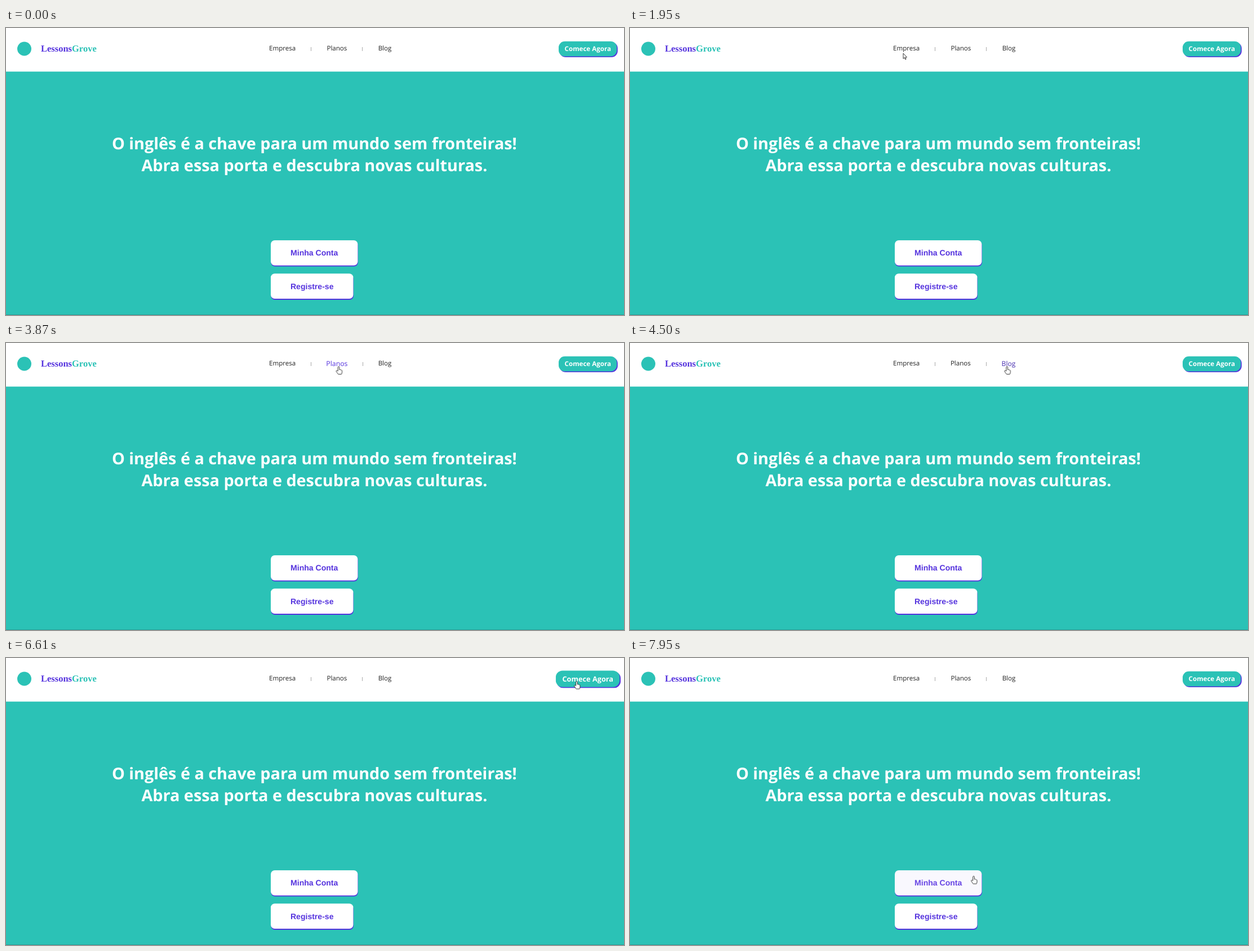
Animation, 1097 px wide and 511 px high, one loop 8 s. Source, as an HTML page:

```html
<!DOCTYPE html>
<html lang="pt-BR">
<head>
<meta charset="utf-8">
<title>LessonsGrove</title>
<style>
:root { --teal: #2bc2b6; --purple: #5533de; }
html, body { margin: 0; width: 100%; height: 100%; overflow: hidden; background: #fff; }
#page, #pointer { position: absolute; left: 0; top: 0; width: 1097px; height: 511px; }
text, nav { text-rendering: geometricPrecision; }
.teal { fill: var(--teal); }
.purple { fill: var(--purple); }
.brand { font: bold 16.5px "Liberation Serif", serif; }
.headline { font: bold 28.8px "Open Sans", sans-serif; fill: #fff; text-anchor: middle; }
.button { font: bold 14.05px "Liberation Sans", Arial, sans-serif; text-anchor: middle; }
.cta { font: bold 11.6px "Open Sans", sans-serif; text-anchor: middle; transform-origin: 1033px 37.4px; }

nav {
  position: absolute; left: 467px; top: 27px; width: 217.4px; height: 20px;
  display: flex; justify-content: space-between;
  font: 11.56px/20px "Open Sans", sans-serif; color: #222;
}
nav i { width: 1px; height: 7px; margin-top: 7px; background: #aaa; }

.company { animation: company 8s linear infinite; }
.plans { animation: plans 8s linear infinite; }
.blog { animation: blog 8s linear infinite; }
.cta { animation: cta 8s ease infinite; }
.account rect:last-of-type { animation: face 8s linear infinite; }
.account text { animation: label 8s linear infinite; }
#cursor { animation: move 8s linear infinite; }
.arrow { animation: arrow 8s step-end infinite; }
.hand { animation: hand 8s step-end infinite; }
.beam { animation: beam 8s step-end infinite; }

/* Hover states */
@keyframes company {
  0%, 26%, 40.25%, 100% { font-size: 11.56px; color: #222; }
  29.75%, 36.5% { font-size: 12.25px; color: #5533de; }
}
@keyframes plans {
  0%, 39.625%, 53.5%, 100% { font-size: 11.56px; color: #222; }
  43.375%, 49.75% { font-size: 12.25px; color: #5533de; }
}
@keyframes blog {
  0%, 53.625%, 65%, 100% { font-size: 11.56px; color: #222; }
  57.125%, 61.25% { font-size: 12.25px; color: #5533de; }
}
@keyframes cta {
  0%, 73.5%, 88%, 100% { transform: scale(1); }
  77.625%, 84.25% { transform: scale(1.1); }
}
@keyframes face {
  0%, 97.4% { fill: #fff; }
  99.375%, 100% { fill: #f9f8fe; }
}
@keyframes label {
  0%, 97.4% { fill: #5533de; }
  99.375%, 100% { fill: #6846e4; }
}

/* Pointer path, one step per 70 ms */
@keyframes move {
  0%, 7% { transform: translate(945px, 492px); animation-timing-function: steps(3); }
  9.625% { transform: translate(699px, 284px); animation-timing-function: steps(1); }
  10.5% { transform: translate(634px, 241px); animation-timing-function: steps(2); }
  12.25% { transform: translate(577px, 197px); animation-timing-function: steps(2); }
  14% { transform: translate(545px, 137px); animation-timing-function: steps(3); }
  16.5% { transform: translate(514px, 102px); animation-timing-function: steps(4); }
  20% { transform: translate(488px, 60px); animation-timing-function: steps(5); }
  24.375% { transform: translate(485px, 45px); animation-timing-function: steps(3); }
  26.875%, 33.875% { transform: translate(496px, 39.5px); animation-timing-function: steps(4); }
  37.375% { transform: translate(543px, 42px); animation-timing-function: steps(3); }
  40% { transform: translate(574px, 43px); animation-timing-function: steps(4); }
  43.375%, 48.375% { transform: translate(590.5px, 42px); animation-timing-function: steps(6); }
  53.625% { transform: translate(661px, 42px); animation-timing-function: steps(4); }
  57.125%, 60.375% { transform: translate(672px, 42px); animation-timing-function: steps(7); }
  66.375% { transform: translate(930.5px, 85.5px); animation-timing-function: steps(4); }
  69.875% { transform: translate(982px, 77px); animation-timing-function: steps(3); }
  72.5% { transform: translate(1000px, 54px); animation-timing-function: steps(2); }
  74.25% { transform: translate(1009px, 45px); animation-timing-function: steps(4); }
  77.625%, 82.625% { transform: translate(1013px, 41.5px); animation-timing-function: steps(2); }
  84.375% { transform: translate(988px, 74px); animation-timing-function: steps(4); }
  87.875% { transform: translate(845px, 158px); animation-timing-function: steps(2); }
  89.625% { transform: translate(767px, 217px); animation-timing-function: steps(3); }
  92.25% { transform: translate(705px, 268px); animation-timing-function: steps(3); }
  94.875% { transform: translate(659px, 338px); animation-timing-function: steps(3); }
  97.5% { transform: translate(620px, 378px); animation-timing-function: steps(2); }
  99.375%, 100% { transform: translate(610px, 388.5px); }
}
@keyframes arrow {
  0%, 10.5%, 25.25%, 39.625%, 53.625%, 73.4%, 89%, 97.4%, 100% { opacity: 0; }
  7%, 14%, 36.5%, 49.75%, 61.25%, 84.375%, 91.5% { opacity: 1; }
}
@keyframes hand {
  0%, 36.5%, 49.75%, 61.25%, 84.375% { opacity: 0; }
  25.25%, 39.625%, 53.625%, 73.4%, 97.4%, 100% { opacity: 1; }
}
@keyframes beam {
  0%, 14%, 91.5%, 100% { opacity: 0; }
  10.5%, 89% { opacity: 1; }
}
</style>
</head>
<body>
<svg id="page" viewBox="0 0 1097 511">
  <rect width="1097" height="511" fill="#fff"/>
  <rect class="teal" y="77.6" width="1097" height="434"/>
  <rect y="510" width="1097" height="1" fill="#239f97"/>

  <circle class="teal" cx="32.5" cy="37" r="12.5"/>
  <text class="brand purple" x="62" y="42">Lessons<tspan class="teal">Grove</tspan></text>

  <g class="cta">
    <rect class="purple" x="982.4" y="25.4" width="103.4" height="26.6" rx="11"/>
    <rect class="teal" x="981" y="23.8" width="103.2" height="26.6" rx="11"/>
    <text x="1032.8" y="41.3" fill="#fff">Comece Agora</text>
  </g>

  <text class="headline" x="547.4" y="215.5">O inglês é a chave para um mundo sem fronteiras!</text>
  <text class="headline" x="547.4" y="254.7">Abra essa porta e descubra novas culturas.</text>

  <g class="button account">
    <rect class="purple" x="470.4" y="379.6" width="154.4" height="45" rx="7"/>
    <rect x="470" y="378" width="154.4" height="44.8" rx="7" fill="#fff"/>
    <text class="purple" x="547.2" y="405.4">Minha Conta</text>
  </g>
  <g class="button">
    <rect class="purple" x="470.4" y="439" width="146.4" height="45" rx="7"/>
    <rect x="470" y="437.3" width="146.4" height="44.8" rx="7" fill="#fff"/>
    <text class="purple" x="543.2" y="464.8">Registre-se</text>
  </g>
</svg>

<nav>
  <span class="company">Empresa</span><i></i>
  <span class="plans">Planos</span><i></i>
  <span class="blog">Blog</span>
</nav>

<svg id="pointer" viewBox="0 0 1097 511">
  <g id="cursor" fill="#fff" stroke="#222" stroke-width=".9" stroke-linejoin="round">
    <path class="arrow" d="M0 0V9.6L2.2 7.6L3.6 11L5.1 10.3L3.7 7.1H6.5Z"/>
    <path class="hand" d="M-1.3 8V1.2Q-1.3 0 0 0T1.3 1.2V5.4Q2.6 4.8 3.1 5.8Q4.4 5.3 4.8 6.4Q6 6.2 6 7.6V10Q6 12 4.9 13.6H-.8Q-2.6 11 -4.4 8.6Q-4.6 6.6 -2.6 7.2Z"/>
    <path class="beam" d="M-2 -5.5H2M0 -5.5V5.5M-2 5.5H2" stroke="#555"/>
  </g>
</svg>
</body>
</html>
```
